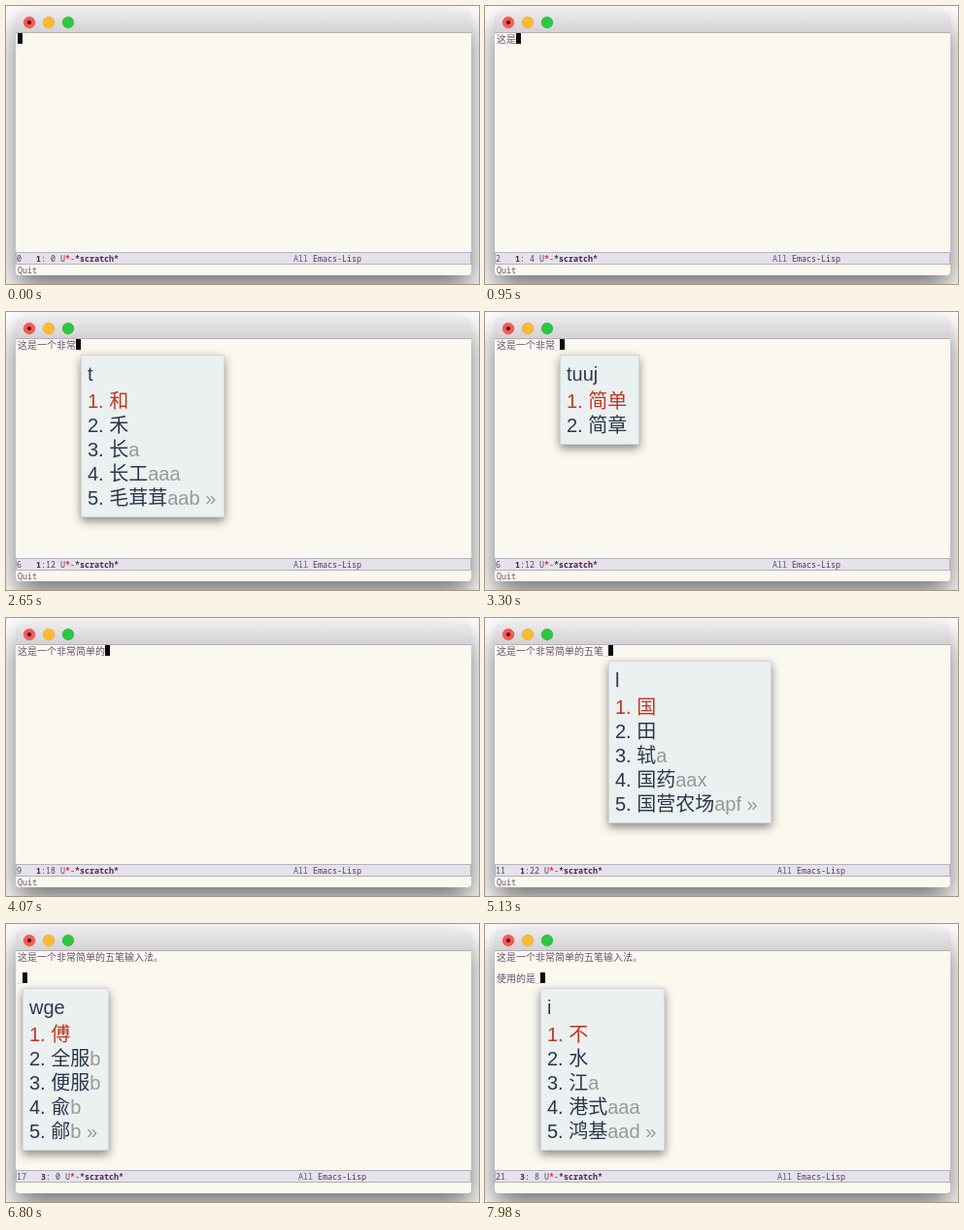
These frames come from a looping animation (487 px wide and 287 px high, 8000 ms). An HTML page with a canvas:

```html
<!DOCTYPE html>
<html lang="zh">
<head>
<meta charset="utf-8">
<title>Wubi typing</title>
<style>
html, body { margin: 0; width: 100%; height: 100%; overflow: hidden; background: #fff; }
canvas { display: block; }
</style>
</head>
<body>
<canvas id="stage" width="487" height="287"></canvas>
<script>
const ctx = document.getElementById('stage').getContext('2d');
const LOOP = 8000;
const TEXT = '这是一个非常简单的五笔输入法。\n\n使用的是';
const MONO = '8.333px "Noto Sans Mono", monospace';
const CJK = '500 10px "Noto Sans CJK SC", "Noto Sans CJK", sans-serif';
const PANEL = '20px "Liberation Sans", "Noto Sans CJK SC", "Noto Sans CJK", sans-serif';

// Candidate panels: code -> [panel width, candidates with their remaining code]
const PANELS = {
  p: [153, '这 之 宽a 社会主义aaw 寒苦aad'],
  j: [131, '是 日 虹a 照相机aad 暴露aaf'],
  g: [128, '一 王 开a 开工aaa 武艺aan'],
  w: [128, '人 八 代a 代工aaa 代劳aap'],
  wh: [120, '个 仆y 个别kl 个性nt 个体ws'],
  d: [155, '在 大 左a 大功告成atd 左右adk'],
  dj: [157, '非 非d 非得tj 非常ip 大是大非dd'],
  dji: [106, '非常p 韭i 非法f 非洲y 非议y'],
  t: [148, '和 禾 长a 长工aaa 毛茸茸aab'],
  tu: [140, '科 税k 简j 科长ta 简单化wx'],
  tuu: [100, '简况k 简装f 简单j 简章j 税前e'],
  tuuj: [82, '简单 简章'],
  r: [154, '的 白 找a 拔苗助长aet 找茬aad'],
  gg: [136, '五 一ll 王gg 五一gg 一班人gw'],
  ggt: [106, '五笔t 五行f 五千f 五香j 五季b'],
  ggtt: [82, '五笔'],
  l: [168, '国 田 轼a 国药aax 国营农场apf'],
  lt: [120, '力 力争qv 力气rn 力度ya 力行tf'],
  lti: [106, '输入法f 力学p'],
  ltif: [98, '输入法'],
  wg: [120, '全 仨g 全国lg 全面dm 全体ws'],
  wge: [89, '傅 全服b 便服b 兪b 鄃b'],
  wget: [82, '使用'],
  i: [128, '不 水 江a 港式aaa 鸿基aad']
};

// [time, committed characters, code being typed, cursor not yet moved]
const STEPS = [
  [0, 0], [650, 0, 'p', true], [710, 1],
  [890, 1, 'j', true], [950, 2],
  [1180, 2, 'g', true], [1240, 3],
  [1420, 3, 'w', true], [1500, 3, 'wh'], [1590, 4],
  [1830, 4, 'd', true], [1880, 4, 'd'], [2120, 4, 'dj'], [2170, 6],
  [2650, 6, 't', true], [2710, 6, 't'], [2770, 6, 'tu'], [2950, 6, 'tuu'], [3300, 6, 'tuuj'],
  [3840, 8, 'r', true], [3900, 8, 'r'], [3990, 8], [4070, 9],
  [4310, 9, 'g'], [4480, 9, 'gg'], [4720, 9, 'ggt'], [4830, 9, 'ggtt'],
  [5130, 11, 'l'], [5370, 11, 'lt'], [5460, 11, 'lti'], [5560, 11, 'ltif'],
  [5650, 11], [5740, 14], [5840, 15],
  [6260, 16], [6360, 17], [6460, 17, 'w'], [6560, 17, 'wg'], [6800, 17, 'wge'], [6860, 17, 'wget'],
  [7150, 19, 'r', true], [7250, 19, 'r'], [7350, 19], [7450, 20],
  [7630, 20, 'j'], [7800, 21], [7980, 21, 'i']
];

function rect(x, y, w, h, color) {
  ctx.fillStyle = color;
  ctx.fillRect(x, y, w, h);
}

function write(text, x, y, font, color) {
  ctx.font = font;
  ctx.fillStyle = color;
  ctx.fillText(text, x, y);
  return x + ctx.measureText(text).width;
}

function shadowed(x, y, w, h, radii, fill, shadow, blur, dy) {
  ctx.save();
  ctx.shadowColor = shadow;
  ctx.shadowBlur = blur;
  ctx.shadowOffsetY = dy;
  ctx.fillStyle = fill;
  ctx.beginPath();
  ctx.roundRect(x, y, w, h, radii);
  ctx.fill();
  ctx.restore();
}

function dot(x, y, r, color, edge) {
  ctx.beginPath();
  ctx.arc(x, y, r, 0, Math.PI * 2);
  ctx.fillStyle = color;
  ctx.fill();
  if (edge) {
    ctx.strokeStyle = edge;
    ctx.lineWidth = 0.6;
    ctx.stroke();
  }
}

function drawWindow() {
  rect(0, 0, 487, 287, '#fff');
  shadowed(10, 6, 469, 272, [5, 5, 4, 4], '#fbf8ef', 'rgba(0,0,0,.55)', 30, 14);
  const bar = ctx.createLinearGradient(0, 6, 0, 27);
  bar.addColorStop(0, '#ebe9eb');
  bar.addColorStop(1, '#d3d1d3');
  ctx.beginPath();
  ctx.roundRect(10, 6, 469, 21, [5, 5, 0, 0]);
  ctx.fillStyle = bar;
  ctx.fill();
  rect(10, 27, 469, 1, '#b4b2b3');
  dot(24, 17, 5.8, '#fc5753', '#df4744');
  dot(24, 17, 2, '#3c0505');
  dot(44, 17, 5.8, '#fdbc2f', '#de9f34');
  dot(64, 17, 5.8, '#2bc840', '#27aa35');
}

function drawModeLine(count, line, column) {
  rect(10, 254, 469, 13, '#b0b4bd');
  rect(11, 255, 467, 11, '#e6e2ea');
  const size = String(count);
  const shift = (size.length - 1) * 5;
  const at = (text, x, color, bold) => write(text, x + shift, 264, (bold ? 'bold ' : '') + MONO, color);
  write(size, 11, 264, MONO, '#5d3b63');
  at(String(line), 31, '#43234c', true);
  at(':' + String(column).padStart(2), 36, '#5d3b63');
  at('U', 56, '#5d3b63');
  at('*', 61, '#e0211d', true);
  at('-', 66, '#5d3b63');
  at('*scratch*', 71, '#4f1f57', true);
  at('All', 296, '#67528c');
  at('Emacs-Lisp', 316, '#55305c');
}

function drawPanel(x, y, code) {
  const [width, list] = PANELS[code];
  const rows = list.split(' ');
  const height = 43 + 25 * rows.length;
  shadowed(x, y, width, height, 2, '#b8c0c0', 'rgba(0,0,0,.45)', 10, 4);
  rect(x + 0.5, y + 0.5, width - 1, height - 1, '#ebf0f0');
  write(code, x + 7, y + 27, PANEL, '#2d3a52');
  rows.forEach((row, i) => {
    const [, word, rest] = row.match(/^([^a-z]+)([a-z]*)$/);
    const base = y + 55 + 25 * i;
    const end = write(`${i + 1}. ${word}`, x + 7, base, PANEL, i ? '#2a374c' : '#c5341f');
    const more = i === 4 ? ' »' : '';
    write(rest + more, end, base, PANEL, '#999');
  });
}

function draw(time) {
  const [, count, code, lagging] = STEPS.findLast(step => step[0] <= time);
  const lines = TEXT.slice(0, count).split('\n');
  const row = lines.length - 1;
  const column = lines[row].length;
  const x = 12 + column * 10;
  const y = 28 + row * 11;
  const composing = code && !lagging;

  drawWindow();
  lines.forEach((text, i) => write(text, 12, 38 + i * 11, CJK, '#655370'));
  if (composing) rect(x, y + 11, 5, 0.5, '#c9c0c4');
  rect(composing ? x + 5 : x, y, 5, 11, '#0b070b');
  drawModeLine(count, lines.length, column * 2);
  if (row === 0) write('Quit', 12, 276, MONO, '#655370');
  if (code) drawPanel(x + 5, y + 16, code);
}

const start = performance.now();
function tick() {
  draw((performance.now() - start) % LOOP);
  requestAnimationFrame(tick);
}
tick();
</script>
</body>
</html>
```
